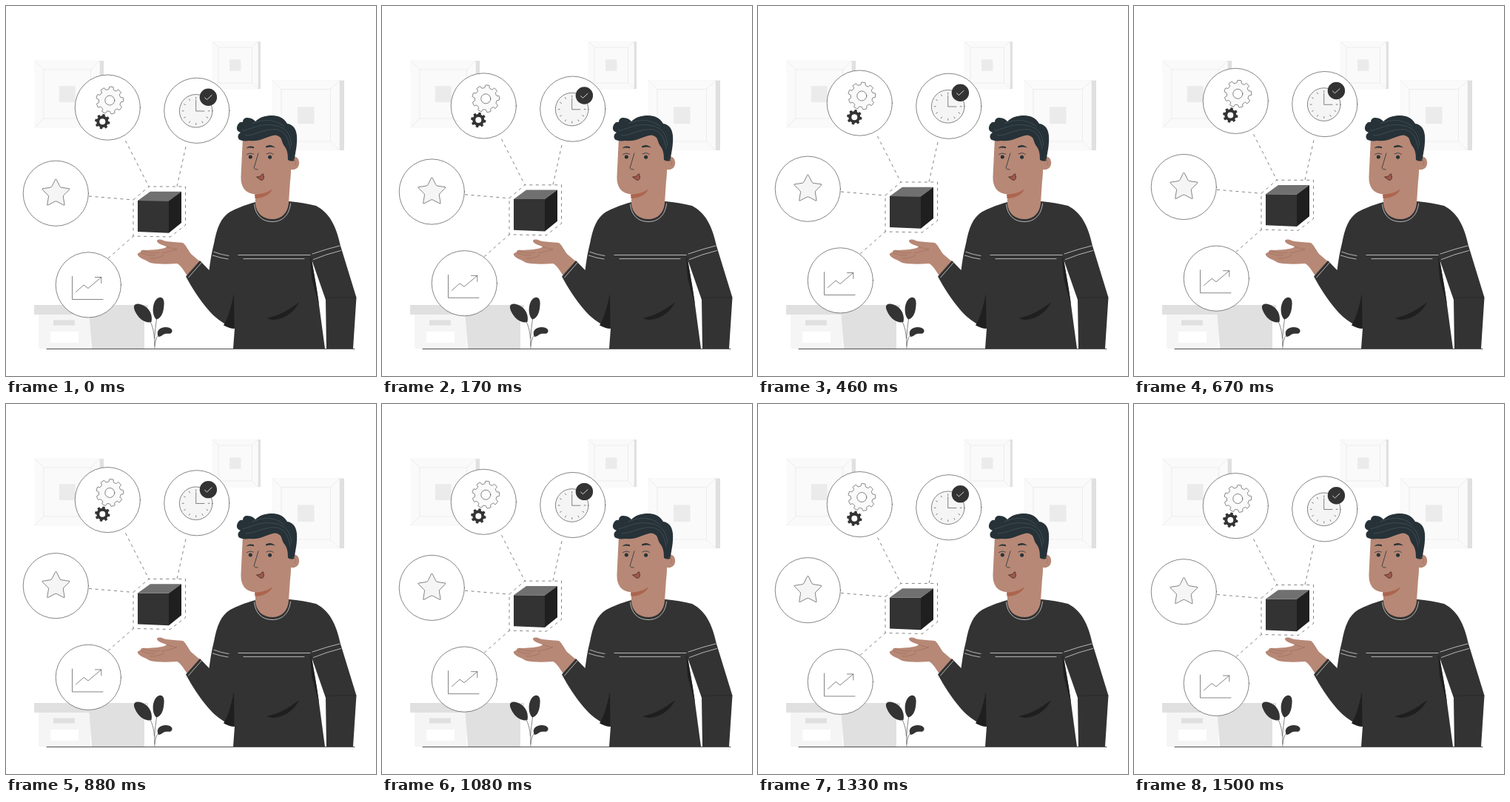
An HTML page that plays this animation: 500 by 500 pixels, repeating every 1540 ms.

```html
<!DOCTYPE html>
<html lang="en">
<head>
<meta charset="utf-8">
<title>Floating ideas</title>
<style>
  html, body { margin: 0; width: 100%; height: 100%; overflow: hidden; background: #fff; }
  svg { display: block; width: 100%; height: 100%; }
  .ink { fill: none; stroke: #333; stroke-width: .6; stroke-linecap: round; stroke-linejoin: round; }
  .pale { fill: #f5f5f5; }
  .disc { fill: #fff; }
  .dash { stroke-dasharray: 4 4.5; stroke-linecap: butt; }
  .trim { fill: none; stroke: #fff; stroke-width: .65; stroke-linecap: round; }
  .skin { fill: #b78876; }
  .fold { fill: none; stroke: #9d6856; stroke-width: .6; stroke-linecap: round; }
  .hair { fill: #263238; }
  .face { fill: none; stroke: #263238; stroke-linecap: round; stroke-linejoin: round; }
  .cloth { fill: #333; }
  .shade { fill: #1f1f1f; }
</style>
</head>
<body>
<svg viewBox="0 0 500 500" xmlns="http://www.w3.org/2000/svg">
  <rect width="500" height="500" fill="#fff"/>
  <g id="wall"></g>

  <g id="crate">
    <path fill="#f5f5f5" d="M44 416H114V463H44Z"/>
    <path fill="#e0e0e0" d="M38 404H192V417H187V463H116L112.500 417H38ZM64 424.500H93V431.500H64Z"/>
    <path fill="#fff" d="M60 440H98V455H60Z"/>
  </g>

  <g id="plant">
    <path class="ink" d="M201 462C200 446 202 434 204 420M200.500 449C200 440 198 431 194 425M201 459C202 450 204 446 208 443"/>
    <path class="cloth" d="M196.500 427C189 429 181 424 176 415.500C171 407 172 402 179 402.500C190 404 199 414 196.500 427Z"/>
    <path class="cloth" d="M203 423.500C197 418 197 402 204 395.500C210 391 214.500 395 213.500 404C213 414 210 422 203 423.500Z"/>
    <path class="cloth" d="M206 447C202 439 208 434 216 434C223 434 226 438 224 441C222 444 219 442 215 443C211 444 210 447 206 447Z"/>
  </g>
  <path class="ink" style="stroke-width:.9" d="M55 463.400H471"/>

  <g id="man">
    <path class="skin" d="M264 347L246 366C241 359 237 351 231 348C218 349 203 349 195 347C189 344 188 343 185 342C179 339 177 336 178 335C179 333 182 333 182 333C181 330 185 329 190 330L205 329C211 328 216 327 217 325C211 323 205 321 204 318C204 315 208 315 213 317C219 319 233 319 239 320C244 324 246 330 250 335Z"/>
    <path class="fold" d="M182 333C188 336 194 338 201 337M185 331C193 334 200 335 207 333M195 341C202 341 208 340 213 337M217 325C222 327 227 328 231 329C223 331 216 333 211 334"/>

    <path class="cloth" d="M337 265C322 269 311 274 303 278C290 286 285 300 281 321C277 337 276 347 274.500 357L262 344L243 365.500C252 382 261 396 272 409C281 420 292 429 309 436L307 463H469L473.500 394L452 324C447 302 440 281 419 270C407 267 395 265 383 264Z"/>
    <path fill="#fff" d="M413.500 344L432 397L433 463H431L422.500 400Z"/>
    <path class="shade" d="M411.500 337C415 356 420 378 423 404L413.500 370C412 358 411.500 348 411.500 337Z"/>
    <path class="shade" d="M308 389C304 408 300 422 294 431.500C299 434 304 436 308.500 436Z"/>
    <path class="shade" d="M353 421.500C368 419 382 411 396 400C390 414 375 424 360 424C356 423.500 354 423 353 421.500Z"/>
    <path class="trim" d="M314 336.500H411M321 341.600H403M281 332.300Q290 336 301 337.500M279.500 337Q289 340.500 300 342M414 335Q434 328 451 324M415.500 342.500Q434 335 452.500 330.500M264 347L246.500 367"/>
    <path class="ink" style="stroke:#222" d="M432 394.500Q453 393 473 394"/>

    <path class="skin" d="M337 245V267C338 280 347 288 360 288C372 288 381 280 382 266L385 222V190H340Z"/>
    <path class="trim" d="M335.500 268C337 283 346 291.500 360 291.500C374 291.500 383 282 384.500 267"/>
    <path class="skin" d="M320 177L317.500 230C317 247 325 254 339 254.500C350 254.500 360 250 384 236L385 221C393 222 397 217 396 210C395 204 389 201 384 206L382 180L350 168Z"/>
    <path fill="#ad654e" d="M336 254.500C345 254.500 353 252 360 247.500C357 255 347 260 336.500 260Z"/>
    <path class="hair" d="M315 180.500C312 176 314 173 317 171C311 169 311 164 313.500 160C315 157 318 156 320 157C320 151 325 150 330 151.500C333 152 335 154 337 156C343 150 351 148 359 148C367 147.500 376 151 380 159C388 160 392 166 393 175C394 187 391 198 389.500 209Q385 210.500 381 208C381 200 380 194 376 189C373 185 373 181 371 178C369 176 367 175 364 174.500C354 175 344 184 329 182C322 183 318 182 315 180.500Z"/>
    <path fill="none" stroke="#52626a" stroke-width=".5" d="M319 169C333 166 345 157 366 162C378 165 384 172 386 188M333 159C347 153 363 152 376 163M323 175C338 175 349 165 366 167C376 169 382 178 384 193"/>
    <path class="hair" d="M324.500 192.500Q328 188 335 190.300L335 192.300Q329 190.800 324.500 192.500ZM351 189.500Q358 185.500 364 191.500Q358 189.500 351.500 191.500Z"/>
    <path class="face" stroke-width=".8" d="M325.500 200.500Q330 197.500 334.500 200M352 200Q357 197 361.500 200.500M341 199L335 219Q336 221.500 340 221"/>
    <circle class="hair" cx="330.300" cy="204" r="2.500"/>
    <circle class="hair" cx="356.600" cy="204.200" r="2.500"/>
    <path fill="#a0584a" stroke="#3c2b2b" stroke-width=".8" stroke-linejoin="round" d="M338.500 231Q344 231 347 226.500C349.500 231 349 235 345 235.500Q342 234 338.500 231Z"/>
    <path class="fold" d="M388 207Q393 208 391 215"/>
  </g>

  <g id="float">
    <path class="ink dash" d="M161.500 182.500L193 244.500M243 190.500L231 244.500M112 257.500L172 262.500M138 341.500L172 311.500"/>
    <path class="ink dash" d="M172 262.500L193 244.500H242.500V296.500L222 312.500L172 311.500Z"/>
    <path class="cloth" d="M178 263.600L220 263.800V307.300L178 305.500Z"/>
    <path fill="#707070" d="M178 263.600L195 251.200H237L220 263.800Z"/>
    <path class="shade" d="M220 263.800L237 251.200V293.500L220 307.300Z"/>
    <g id="discs"></g>

    <path class="ink" fill="#fafafa" id="bigGear"/>
    <circle class="ink disc" cx="140.300" cy="128" r="6.500"/>
    <path class="cloth" id="smallGear"/>
    <circle class="disc" cx="130.300" cy="156.700" r="4"/>

    <circle class="ink pale" cx="256.700" cy="142.300" r="22.300"/>
    <path class="ink" id="ticks"/>
    <path class="ink" d="M256.700 127.500V142.500H268"/>
    <circle class="cloth" cx="273.400" cy="123.700" r="11.700"/>
    <path class="trim" style="stroke-width:.8" d="M268.500 124.300L271.500 127L278 121"/>

    <path class="ink pale" id="star"/>
    <path class="ink" d="M89.500 366V397H131M94.500 387L105 377.500L111 382L128.800 367M120.500 367H128.800V375"/>
  </g>
</svg>
<script>
const $ = id => document.getElementById(id);
const TURN = Math.PI * 2;
const polar = (cx, cy, r, a) => [cx + r * Math.cos(a), cy + r * Math.sin(a)];
const xy = p => p.map(n => n.toFixed(2)).join(' ');
const mix = (p, q, k) => [p[0] + (q[0] - p[0]) * k, p[1] + (q[1] - p[1]) * k];

function pictureFrame(x, y, w, h, side, inset) {
  const r = x + w, b = y + h, s = w * .25;
  const l = x + inset, t = y + inset, ir = r - inset, ib = b - inset;
  const sx = x + (w - s) / 2, sy = y + (h - s) / 2;
  return `<path fill="#e0e0e0" d="M${r} ${y}h${side}v${h}h${-side}z"/>
    <path fill="#fafafa" stroke="#f0f0f0" stroke-width=".5" d="M${x} ${y}h${w}v${h}h${-w}z"/>
    <path fill="none" stroke="#e3e3e3" stroke-width=".6"
      d="M${l} ${t}H${ir}V${ib}H${l}ZM${x} ${y}L${l} ${t}M${r} ${y}L${ir} ${t}M${x} ${b}L${l} ${ib}M${r} ${b}L${ir} ${ib}"/>
    <path fill="#ebebeb" d="M${sx} ${sy}h${s}v${s}h${-s}z"/>`;
}

// Closed outline with softened corners
function rounded(pts, k) {
  const n = pts.length;
  return pts.map((p, i) => {
    const a = mix(p, pts[(i + n - 1) % n], k), b = mix(p, pts[(i + 1) % n], k);
    return `${i ? 'L' : 'M'}${xy(a)}Q${xy(p)} ${xy(b)}`;
  }).join('') + 'Z';
}

function gear(cx, cy, inner, outer, teeth, turn) {
  const step = TURN / teeth, pts = [];
  for (let i = 0; i < teeth; i++) {
    const a = turn + i * step;
    pts.push(polar(cx, cy, inner, a - step * .29), polar(cx, cy, outer, a - step * .22),
      polar(cx, cy, outer, a + step * .22), polar(cx, cy, inner, a + step * .29));
  }
  return rounded(pts, .2);
}

function star(cx, cy, outer, inner) {
  const pts = [];
  for (let i = 0; i < 10; i++)
    pts.push(polar(cx, cy, i % 2 ? inner : outer, TURN * (i / 10 - .25)));
  return rounded(pts, .12);
}

function clockTicks(cx, cy) {
  let d = '';
  for (let i = 0; i < 12; i++) {
    const a = TURN * i / 12;
    d += 'M' + xy(polar(cx, cy, 16.5, a)) + 'L' + xy(polar(cx, cy, 18.5, a));
  }
  return d;
}

$('wall').innerHTML = pictureFrame(39, 74, 87.5, 90, 5.5, 12)
  + pictureFrame(279, 48, 61.5, 64, 3.5, 8)
  + pictureFrame(360, 100.5, 90.5, 94.5, 6.5, 12);
$('discs').innerHTML = [[137.3, 137.6], [257.8, 141.8], [67.3, 253.7], [111.3, 377.4]]
  .map(([x, y]) => `<circle class="ink disc" cx="${x}" cy="${y}" r="44.1"/>`).join('');
$('bigGear').setAttribute('d', gear(140.3, 128, 15, 18.6, 9, -1.45));
$('bigGear').style.fill = '#fafafa';
$('smallGear').setAttribute('d', gear(130.3, 156.7, 8, 10.3, 8, .2));
$('star').setAttribute('d', star(67.4, 253.8, 20.3, 10.2));
$('ticks').setAttribute('d', clockTicks(256.7, 142.3));

const LOOP = 1540, STEP = 1000 / 24, TOP = 725, REST = 1490;

// Linear rise and fall, held in 24 fps steps
function lift(ms) {
  const t = Math.floor((ms + 5) / STEP) * STEP;
  if (t < TOP) return -.5 - 9.5 * t / TOP;
  return -10 * Math.max(0, (REST - t) / (REST - TOP));
}

const start = performance.now();
function draw(now) {
  const ms = Math.max(0, now - start) % LOOP;
  $('float').setAttribute('transform', `translate(0 ${lift(ms).toFixed(3)})`);
  requestAnimationFrame(draw);
}
draw(start);
</script>
</body>
</html>
```
